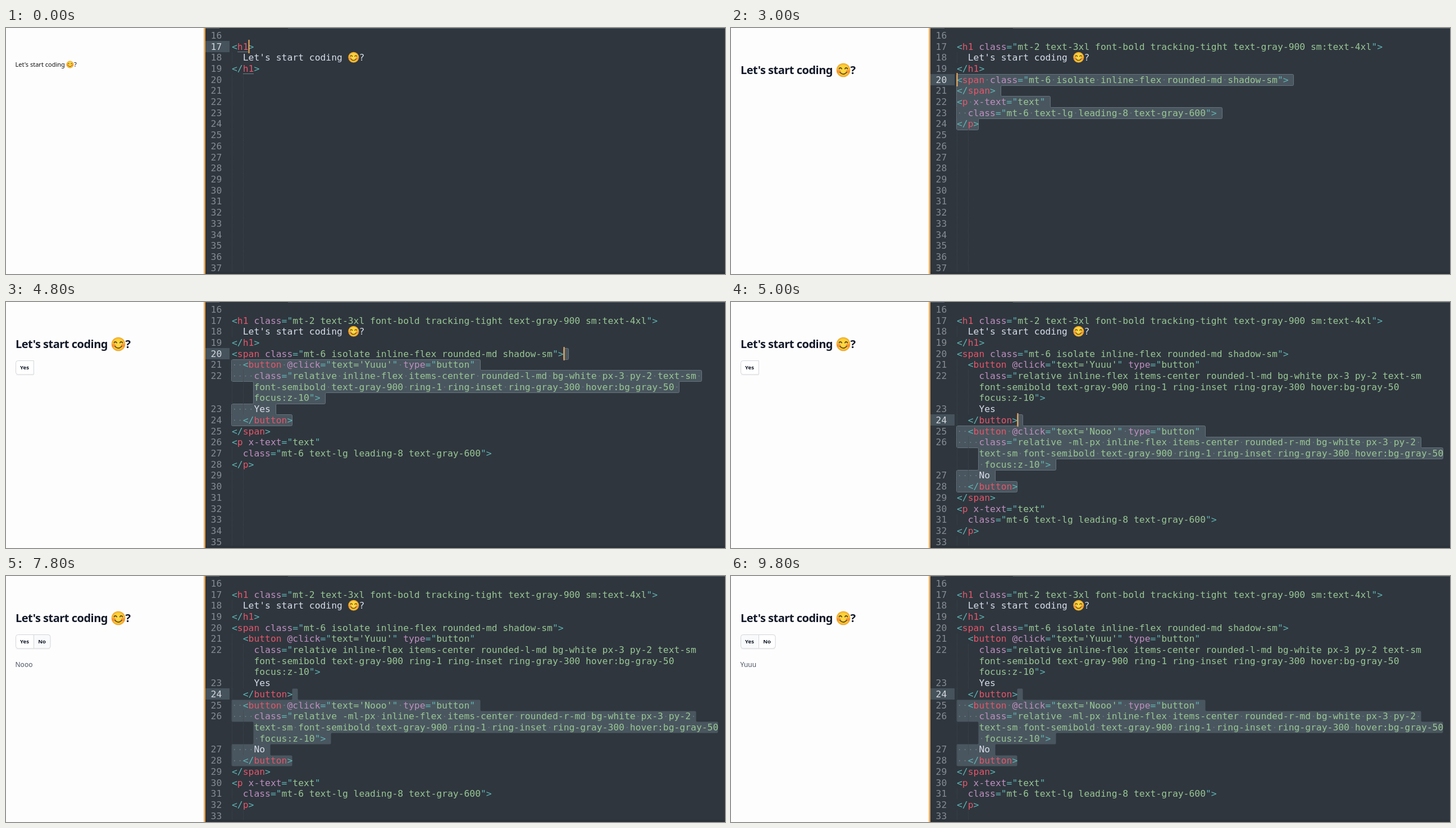
Animation, 1280 px wide and 438 px high, one loop 10000 ms. Source, as an HTML page with a canvas:

```html
<!DOCTYPE html>
<html lang="en">
<head>
<meta charset="utf-8">
<title>Live coding preview</title>
<style>
html, body { margin: 0; width: 100%; height: 100%; overflow: hidden; background: #fefefe; }
canvas { display: block; width: 1280px; height: 438px; }
</style>
</head>
<body>
<canvas id="stage" width="1280" height="438"></canvas>
<script>
const ctx = document.getElementById('stage').getContext('2d');
const LOOP = 10000, X0 = 402, CW = 9.844, ROW_H = 19.71, MID0 = 13;
const CODE_FONT = '16.35px "DejaVu Sans Mono", monospace';
const UI_FONT = '"Noto Sans", "Open Sans", sans-serif';
const SMILE = '😊';
const COLOR = {
  bg: '#2f363e', text: '#d8dee9', punct: '#5fb4b4', tag: '#e5566a', attr: '#c08fc0',
  string: '#99c794', number: '#858c94', active: '#d3d8de', dot: '#75838e',
  gutter: '#46535c', select: '#4a565f', edge: '#66737d', guide: '#3c454d', caret: '#f5ad5a'
};

// Code lines; "\n" marks a soft wrap, "\u00a0" a space without a whitespace dot.
const plainTitle = ['<h1>', `  Let's start coding ${SMILE}?`, '</h1>'];
const title = ['<h1 class="mt-2 text-3xl font-bold tracking-tight text-gray-900 sm:text-4xl">', ...plainTitle.slice(1)];
const spanOpen = '<span class="mt-6 isolate inline-flex rounded-md shadow-sm">';
const tail = ['</span>', '<p x-text="text"', '  class="mt-6 text-lg leading-8 text-gray-600">', '</p>'];
const button = (word, classes, label) => [
  `  <button @click="text='${word}'" type="button"`,
  `    class="${classes}">`, `    ${label}`, '  </button>'
];
const yes = button('Yuuu', 'relative inline-flex items-center rounded-l-md bg-white px-3 py-2 text-sm \n' +
  'font-semibold text-gray-900 ring-1 ring-inset ring-gray-300 hover:bg-gray-50 \nfocus:z-10', 'Yes');
const no = button('Nooo', 'relative\u00a0-ml-px inline-flex items-center rounded-r-md bg-white px-3 py-2 \n' +
  'text-sm font-semibold text-gray-900 ring-1 ring-inset ring-gray-300 hover:bg-gray-50\n focus:z-10', 'No');

const scenes = [
  { at: 0, rows: layout(plainTitle), caret: [1, 3], underline: true },
  { at: 200, rows: layout(title), sel: [1, 3, 1, 76], caret: [1, 76] },
  { at: 2000, rows: layout([...title, spanOpen, ...tail]), sel: [4, 0, 8, 4], caret: [4, 0] },
  { at: 3600, rows: layout([...title, spanOpen, ...yes, ...tail]), sel: [4, 60, 10, 11], caret: [4, 60] },
  { at: 5000, rows: layout([...title, spanOpen, ...yes, ...no, ...tail]), sel: [10, 11, 16, 11], caret: [10, 11] }
];
const BOLD_AT = 800, YES_AT = 4200, NO_AT = 5600, HOVER_NO = 7000, CLICK_NO = 7800,
  HOVER_YES = 8800, CLICK_YES = 9000;

function layout(lines) {
  const rows = [{ n: 16, col: 0, cells: [], guides: 0 }];
  let inTag = false, inString = false, n = 17;
  const tokenize = text => {
    const cells = [];
    const parts = text.match(/<\/?[\w]+|[\w@-]+|\s|./gu) || [];
    const put = (s, color) => { for (const ch of s) cells.push({ ch, color }); };
    for (const part of parts) {
      if (inString) {
        put(part, part === '"' ? COLOR.punct : COLOR.string);
        if (part === '"') inString = false;
      } else if (part[0] === '<') {
        const lead = part[1] === '/' ? 2 : 1;
        put(part.slice(0, lead), COLOR.punct);
        put(part.slice(lead), COLOR.tag);
        inTag = true;
      } else if (inTag) {
        put(part, /^[\w@]/.test(part) ? COLOR.attr : COLOR.punct);
        if (part === '"') inString = true;
        if (part === '>') inTag = false;
      } else {
        put(part, COLOR.text);
        if (part === SMILE) cells.push({ ch: '', color: COLOR.text });
      }
    }
    return cells;
  };
  for (const line of lines) {
    const guides = line.match(/^ */)[0].length / 2;
    line.split('\n').forEach((text, i, all) => rows.push({
      n: i ? null : n, col: i ? 4 : 0, cells: tokenize(text), guides, wraps: i < all.length - 1
    }));
    n++;
  }
  while (rows.length < 22) rows.push({ n: n++, col: 0, cells: [], guides: 2 });
  return rows;
}

const rowTop = i => MID0 + (i - 0.5) * ROW_H;
const colX = c => X0 + c * CW;

function box(x, y, w, h, color) {
  ctx.fillStyle = color;
  ctx.fillRect(x, y, w, h);
}

function label(text, x, y, font, color, spacing = 0) {
  ctx.font = font;
  ctx.fillStyle = color;
  ctx.letterSpacing = spacing + 'px';
  ctx.fillText(text, x, y);
  ctx.letterSpacing = '0px';
}

function smiley(x, y, r) {
  ctx.save();
  ctx.translate(x, y);
  ctx.scale(r, r);
  const face = ctx.createRadialGradient(0, -0.1, 0.2, 0, 0, 1);
  face.addColorStop(0, '#fdd93f');
  face.addColorStop(0.65, '#fbcc34');
  face.addColorStop(1, '#ef9f28');
  const disc = (cx, cy, rx, ry, fill) => {
    ctx.fillStyle = fill;
    ctx.beginPath();
    ctx.ellipse(cx, cy, rx, ry, 0, 0, Math.PI * 2);
    ctx.fill();
  };
  disc(0, 0, 1, 1, face);
  for (const s of [-1, 1]) disc(s * 0.65, 0.2, 0.27, 0.22, 'rgba(244,120,60,.65)');
  ctx.strokeStyle = '#5f432a';
  ctx.lineCap = 'round';
  ctx.lineWidth = 0.14;
  const arc = (cx, cy, ar, a, b) => {
    ctx.beginPath();
    ctx.arc(cx, cy, ar, a * Math.PI, b * Math.PI);
    ctx.stroke();
  };
  for (const s of [-1, 1]) arc(s * 0.42, -0.12, 0.2, 1.1, 1.9);
  arc(0, 0.02, 0.55, 0.17, 0.83);
  ctx.restore();
}

// Horizontal extent of the selection on each row it touches.
function selectionSpans({ rows, sel }) {
  const [r0, c0, r1, c1] = sel, spans = [];
  for (let i = r0; i <= r1; i++) {
    const row = rows[i], end = row.col + row.cells.length + (row.wraps ? 0 : 1);
    spans.push({ row: i, from: i === r0 ? c0 : row.col, to: i === r1 ? c1 : end });
  }
  return spans;
}

function drawSelection(spans, focused) {
  const groups = [];
  spans.forEach((s, i) => {
    if (i && s.to > spans[i - 1].from && s.from < spans[i - 1].to) groups[groups.length - 1].push(s);
    else groups.push([s]);
  });
  for (const group of groups) {
    const right = [], left = [];
    for (const s of group) {
      const top = Math.round(rowTop(s.row)) + 0.5, bottom = Math.round(rowTop(s.row + 1)) + 0.5;
      const a = Math.round(colX(s.from)) - 0.5, b = Math.round(colX(s.to)) - 0.5;
      right.push([b, top], [b, bottom]);
      left.unshift([a, bottom], [a, top]);
    }
    const pts = [...right, ...left], last = pts[pts.length - 1];
    ctx.beginPath();
    ctx.moveTo((last[0] + pts[0][0]) / 2, pts[0][1]);
    pts.forEach((p, i) => {
      const q = pts[(i + 1) % pts.length];
      ctx.arcTo(p[0], p[1], q[0], q[1], 2);
    });
    ctx.closePath();
    ctx.fillStyle = COLOR.select;
    ctx.fill();
    if (focused) {
      ctx.strokeStyle = COLOR.edge;
      ctx.lineWidth = 1;
      ctx.stroke();
    }
  }
}

function drawRow(row, i, active, span) {
  const top = rowTop(i), base = top + ROW_H / 2 + 5.8;
  for (let g = 0; g < row.guides; g++) {
    ctx.fillStyle = COLOR.guide;
    for (let y = Math.round(top); y < top + ROW_H; y += 2) ctx.fillRect(Math.round(colX(g * 2)), y, 1, 1);
  }
  ctx.font = CODE_FONT;
  if (row.n) {
    ctx.fillStyle = active ? COLOR.active : COLOR.number;
    [...String(row.n)].forEach((d, k) => ctx.fillText(d, 364.6 + k * CW, base));
  }
  row.cells.forEach(({ ch, color }, k) => {
    const col = row.col + k, x = colX(col);
    if (ch === SMILE) smiley(x + CW + 0.2, top + ROW_H / 2 - 0.2, 9.5);
    else if (ch === ' ') {
      if (span && col >= span.from && col < span.to) box(x + 4, top + 9.5, 1.6, 1.6, COLOR.dot);
    } else if (ch) {
      ctx.fillStyle = color;
      ctx.fillText(ch, x, base);
    }
  });
}

function drawEditor(t) {
  const scene = scenes.filter(s => s.at <= t).pop();
  const focused = t < CLICK_NO, [caretRow, caretCol] = scene.caret;
  box(352, 0, 928, 438, COLOR.bg);
  box(354, 0, 26, 1, '#56606a');
  box(502, 0, 778, 1, '#56606a');
  box(352, 0, 3, 438, '#e9ab5c');
  box(355, Math.round(rowTop(caretRow)), 43, 20, COLOR.gutter);
  const spans = scene.sel ? selectionSpans(scene) : [];
  drawSelection(spans, focused);
  scene.rows.slice(0, 22).forEach((row, i) =>
    drawRow(row, i, i === caretRow, spans.find(s => s.row === i)));
  if (scene.underline) {
    box(412, 42, 19, 1, '#737c84');
    box(422, 81, 19, 1, '#737c84');
  }
  if (focused) box(Math.round(colX(caretCol)) - 0.5, Math.round(rowTop(caretRow)) - 2, 2, 24, COLOR.caret);
  box(355, 434, 925, 4, '#2b3239');
}

function drawButton(x, w, radii, text, textX, hover) {
  ctx.beginPath();
  ctx.roundRect(x, 104.5, w, 24.5, radii);
  ctx.fillStyle = hover ? '#f9fafb' : '#ffffff';
  ctx.fill();
  ctx.strokeStyle = '#d3d5d9';
  ctx.lineWidth = 1;
  ctx.stroke();
  label(text, textX, 120.3, `bold 9.6px ${UI_FONT}`, '#111827');
}

function drawPreview(t) {
  box(0, 0, 352, 438, '#fefdfe');
  if (t < BOLD_AT) {
    const font = `11px ${UI_FONT}`;
    label("Let's start coding", 16.5, 69, font, '#111');
    smiley(114, 65, 6.5);
    label('?', 121, 69, font, '#111');
  } else {
    const font = `bold 20px ${UI_FONT}`;
    label("Let's start coding", 17, 82, font, '#111827', -0.5);
    smiley(200, 75, 12.3);
    label('?', 212.5, 82, font, '#111827', -0.5);
  }
  if (t >= YES_AT) {
    box(18, 129.5, t >= NO_AT ? 60 : 31, 1, '#eeeef0');
    drawButton(17.5, 32, [4, 0, 0, 4], 'Yes', 25, t >= HOVER_YES);
  }
  if (t >= NO_AT) drawButton(49.5, 29.5, [0, 4, 4, 0], 'No', 57.3, t >= HOVER_NO && t < HOVER_YES);
  if (t >= CLICK_NO) label(t < CLICK_YES ? 'Nooo' : 'Yuuu', 16.5, 162.3, `12px ${UI_FONT}`, '#4b5563');
}

function frame(now) {
  const t = now % LOOP;
  drawPreview(t);
  drawEditor(t);
  requestAnimationFrame(frame);
}
requestAnimationFrame(frame);
</script>
</body>
</html>
```
